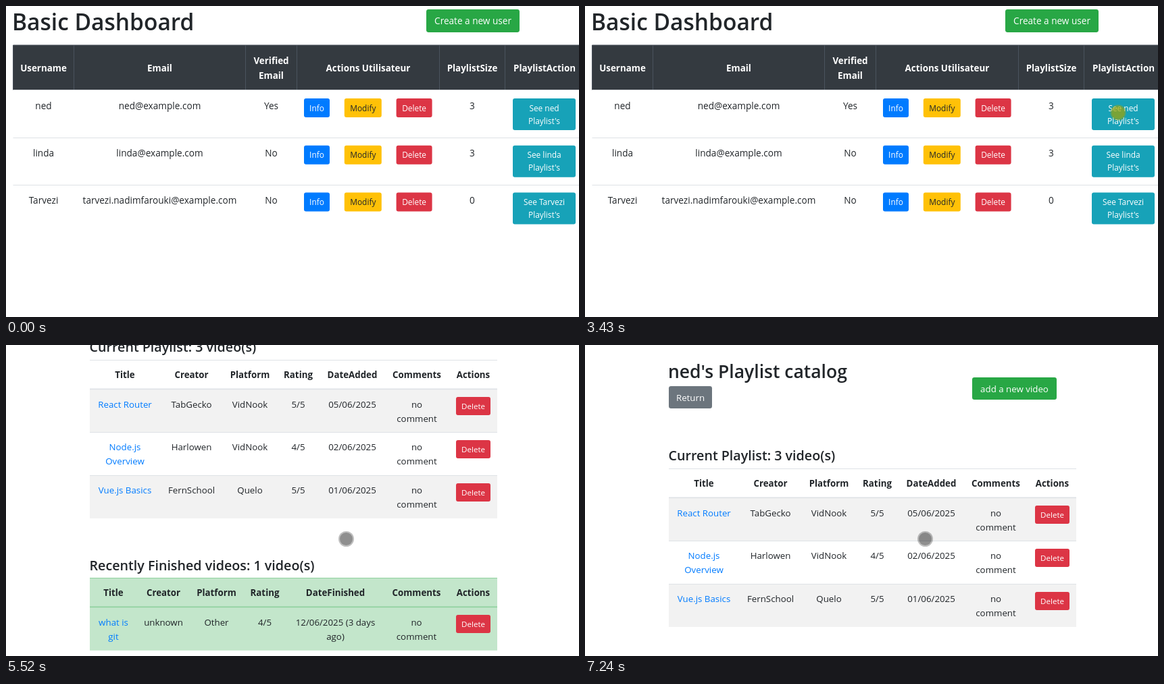
Recreate the animation shown at these times as an HTML page with a canvas. Size 848 by 461 pixels, loop 7990 ms.

```html
<!DOCTYPE html>
<html lang="en">
<head>
<meta charset="utf-8">
<title>Playlist dashboard</title>
<style>
html, body { margin: 0; width: 100%; height: 100%; overflow: hidden; background: #fff; }
canvas { display: block; }
</style>
</head>
<body>
<canvas id="stage" width="848" height="461"></canvas>
<script>
const ctx = document.getElementById('stage').getContext('2d');
const LOOP = 7990, TICK = 70;
const PRESS = 3430, RELEASE = 3560, PAGE_SWITCH = 3650;
const INK = '#212529', LINE = '#dee2e6', BLUE = '#007bff', GREEN = '#28a745',
      RED = '#dc3545', AMBER = '#ffc107', TEAL = '#17a2b8', GREY = '#6c757d';

// Pointer stops; bulge bows the way to the next stop sideways
const STOPS = [
  { t: 590, x: 690, y: 326, bulge: 45 },
  { t: 1430, x: 647, y: 84, bulge: -78 },
  { t: 1880, x: 690, y: 217, bulge: 53 },
  { t: 2190, x: 691, y: 40, bulge: 0 },
  { t: 2670, x: 789, y: 158, bulge: 0 },
  { t: 4490, x: 789, y: 158, bulge: 0 },
  { t: 4560, x: 778.5, y: 164.5, bulge: 0 },
  { t: 4760, x: 503.5, y: 287.5, bulge: 0 }
];

const ticked = ms => Math.floor(ms / TICK) * TICK;

function pointerAt(t) {
  const i = STOPS.findLastIndex(s => t >= s.t);
  const a = STOPS[i], b = STOPS[i + 1];
  if (!b) return a;
  const u = ticked(t - a.t) / (b.t - a.t);
  return {
    x: a.x + (b.x - a.x) * u + a.bulge * Math.sin(Math.PI * u),
    y: a.y + (b.y - a.y) * u
  };
}

// Wheel scroll: fast start, exponential settling
function scrollAt(t) {
  const depth = 168, down = 5090, up = 6330;
  const rest = since => depth * Math.exp(-(ticked(t - since) + 84) / 161);
  if (t < down) return 0;
  return Math.round(t < up ? depth - rest(down) : rest(up));
}

function rect(x, y, w, h, color) {
  ctx.fillStyle = color;
  ctx.fillRect(x, y, w, h);
}

function text(str, x, y, size, { weight = 400, color = INK, align = 'center' } = {}) {
  ctx.font = `${weight} ${size}px "Open Sans", "Noto Sans", sans-serif`;
  ctx.textAlign = align;
  ctx.fillStyle = color;
  ctx.fillText(str, x, y);
}

function lines(str, x, y, pitch, size, style) {
  str.split('\n').forEach((s, i) => text(s, x, y + i * pitch, size, style));
}

function title(str, x, y, size) {
  text(str, x, y, size, { weight: 600, align: 'left' });
}

function button(label, x, y, w, h, fill, size, color = '#fff') {
  ctx.fillStyle = fill;
  ctx.beginPath();
  ctx.roundRect(x, y, w, h, size * 0.25);
  ctx.fill();
  const pitch = 19, extra = label.split('\n').length - 1;
  const base = Math.round(y + (h - extra * pitch) / 2 + size * 0.4);
  lines(label, x + w / 2, base, pitch, size, { color });
}

// Turns { label: width } into columns with left edge and centre
function layout(left, widths) {
  return Object.entries(widths).map(([label, w]) => {
    const col = { label, left, mid: left + w / 2 };
    left += w;
    return col;
  });
}

const USER_COLS = layout(10.5, {
  Username: 90, Email: 254, 'Verified\nEmail': 76, 'Actions Utilisateur': 211,
  PlaylistSize: 97, PlaylistAction: 117
});
const CURRENT_COLS = layout(124, {
  Title: 104, Creator: 93, Platform: 80, Rating: 63, DateAdded: 97, Comments: 94, Actions: 73
});
const FINISHED_COLS = layout(124, {
  Title: 70, Creator: 78, Platform: 79, Rating: 64, DateFinished: 145, Comments: 95, Actions: 73
});

const USERS = [
  ['ned', 'ned@example.com', 'Yes', '3'],
  ['linda', 'linda@example.com', 'No', '3'],
  ['Tarvezi', 'tarvezi.nadimfarouki@example.com', 'No', '0']
];
const CURRENT = [
  ['React Router', 'TabGecko', 'VidNook', '5/5', '05/06/2025', 'no\ncomment'],
  ['Node.js\nOverview', 'Harlowen', 'VidNook', '4/5', '02/06/2025', 'no\ncomment'],
  ['Vue.js Basics', 'FernSchool', 'Quelo', '5/5', '01/06/2025', 'no\ncomment']
];
const FINISHED = [
  ['what is\ngit', 'unknown', 'Other', '4/5', '12/06/2025 (3 days\nago)', 'no\ncomment']
];
const ACTIONS = [['Info', 38, BLUE], ['Modify', 55, AMBER, INK], ['Delete', 53, RED]];

function drawDashboard() {
  const size = 13.6, small = 11.9, left = 10.5, edge = '#4a535d';
  title('Basic Dashboard', 9, 36, 33.5);
  button('Create a new user', 622, 5, 138, 34, GREEN, size);

  rect(left, 58, 838, 67, '#343a40');
  rect(left, 57.5, 838, 1, edge);
  rect(left, 124, 838, 1, LINE);
  for (const col of USER_COLS) {
    rect(col.left - 0.5, 58, 1, 66, edge);
    const base = col.label.includes('\n') ? 86 : 97;
    lines(col.label, col.mid, base, 22, 13.4, { weight: 700, color: '#fff' });
  }

  const [name, mail, verified, , count] = USER_COLS;
  USERS.forEach((user, i) => {
    const y = 137 + i * 69.7, base = 153 + i * 70;
    if (i) rect(left, 125 + i * 70, 838, 1, LINE);
    [name, mail, verified, count].forEach((col, k) => text(user[k], col.mid, base, size));
    let x = 441;
    for (const [label, w, fill, color] of ACTIONS) {
      button(label, x, y, w, 28, fill, small, color);
      x += w + 21.8;
    }
    button(`See ${user[0]}\nPlaylist's`, 750, y, 93, 47, TEAL, small);
  });
}

function drawTable(top, cols, rows, { line, stripe, fill }) {
  const left = 124, width = 603, size = 13.3, pitch = 63.8;
  if (fill) rect(left, top, width, 44 + rows.length * pitch, fill);
  rect(left, top, width, 1, line);
  for (const col of cols) text(col.label, col.mid, top + 27, size, { weight: 700 });
  rows.forEach((row, r) => {
    const y = top + 44 + pitch * r, edge = Math.round(y);
    if (stripe && r % 2 === 0) rect(left, edge, width, 63, stripe);
    if (r) rect(left, edge - 1, width, 1, line);
    row.forEach((s, i) => lines(s, cols[i].mid, Math.floor(y + 27), 21, size, { color: i ? INK : BLUE }));
    button('Delete', 666, Math.round(y + 11), 51, 27, RED, 11.6);
  });
  rect(left, top + 42.5, width, 1.7, line);
}

function drawCatalog(scroll) {
  ctx.save();
  ctx.translate(0, -scroll);
  title("ned's Playlist catalog", 123, 49, 26.5);
  button('Return', 124, 61, 64, 33, GREY, 13.3);
  button('add a new video', 573, 48, 125, 33, GREEN, 13.3);
  title('Current Playlist: 3 video(s)', 123.5, 171, 19.7);
  drawTable(183, CURRENT_COLS, CURRENT, { line: LINE, stripe: '#f2f2f2' });
  title('Recently Finished videos: 1 video(s)', 123.5, 495, 19.7);
  drawTable(506, FINISHED_COLS, FINISHED, { line: '#8fd19e', fill: '#c3e6cb' });
  ctx.restore();
}

function disc({ x, y }, r, color) {
  ctx.fillStyle = color;
  ctx.beginPath();
  ctx.arc(x, y, r, 0, Math.PI * 2);
  ctx.fill();
}

function drawPointer(t) {
  if (t < STOPS[0].t) return;
  const pressed = t >= PRESS && t < RELEASE;
  const color = pressed ? 'rgba(165,165,0,.45)' : 'rgba(0,0,0,.25)';
  const at = pointerAt(t);
  disc(at, 11.5, color);
  disc(at, 9.5, color);
}

function frame(now) {
  const t = now % LOOP;
  rect(0, 0, 848, 461, '#fff');
  if (t < PAGE_SWITCH) drawDashboard();
  else drawCatalog(scrollAt(t));
  drawPointer(t);
  requestAnimationFrame(frame);
}
requestAnimationFrame(frame);
</script>
</body>
</html>
```
